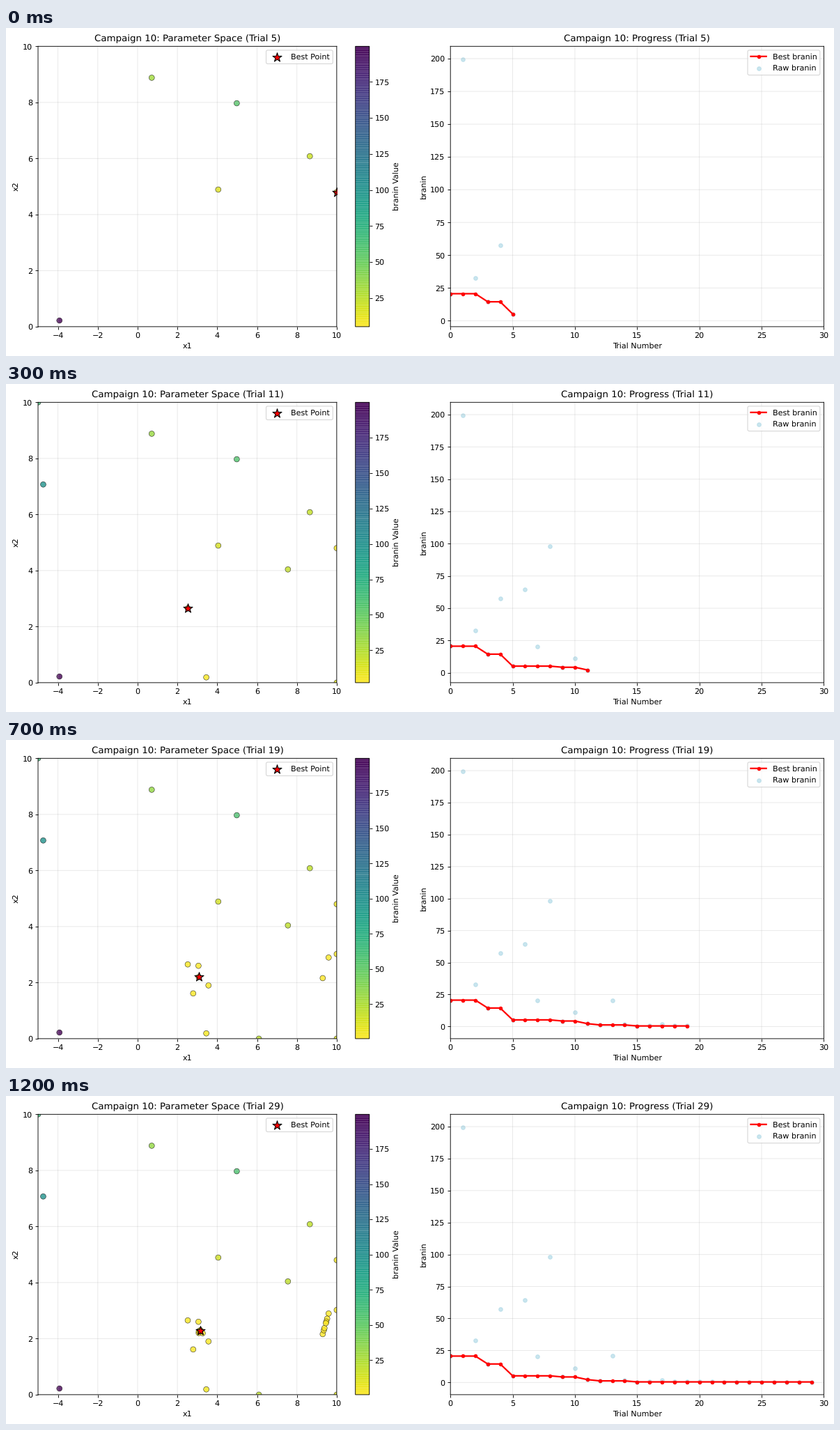
A matplotlib script that plays this animation: 1189x471 px, repeating every 1300 ms.

```python
import numpy as np
import matplotlib.pyplot as plt
from matplotlib.animation import FuncAnimation

# Unhinted, unsnapped drawing keeps everything on fractional pixels
plt.rcParams.update({"text.hinting": "no_hinting", "path.snap": False})

WIDTH, HEIGHT, DPI = 1189, 471, 80
FIRST_TRIAL, STEP, FRAMES, INTERVAL = 5, 2, 13, 100
TRIALS = FIRST_TRIAL + STEP * (FRAMES - 1) + 1

# Wide search of the space: x1 + x2 * j
EXPLORED = [
    8.65 + 6.08j, -3.925 + 0.22j, 0.71 + 8.88j, 4.05 + 4.89j,
    4.98 + 7.97j, 10 + 4.8j, -5 + 10j, 7.55 + 4.04j,
    -4.74 + 7.07j, 3.45 + 0.19j, 10 + 0j, 2.52 + 2.65j,
    3.56 + 1.90j, 6.09 + 0j, 10 + 3.02j, 3.07 + 2.20j,
]
LEFT_MINIMUM, RIGHT_MINIMUM = np.pi + 2.275j, 3 * np.pi + 2.475j
GOLDEN_ANGLE = np.pi * (3 - np.sqrt(5))


def refine(step):
    """Close in on both minima in turn with shrinking, turning offsets."""
    visit, on_left = divmod(step, 2)
    if on_left:
        start, turn = -0.35 - 0.66j, 0.45 * np.exp(-1j * GOLDEN_ANGLE)
        return LEFT_MINIMUM + start * turn ** visit
    return RIGHT_MINIMUM + (0.17 + 0.42j) * (-0.75) ** visit


def branin(x1, x2):
    bowl = x2 - 5.1 / (4 * np.pi ** 2) * x1 ** 2 + 5 / np.pi * x1 - 6
    return bowl ** 2 + 10 * (1 - 1 / (8 * np.pi)) * np.cos(x1) + 10


POINTS = np.array(EXPLORED + [refine(i) for i in range(TRIALS - len(EXPLORED))])
X1, X2 = POINTS.real, POINTS.imag
VALUES = branin(X1, X2)
BEST = np.minimum.accumulate(VALUES)

fig = plt.figure(figsize=(WIDTH / DPI, HEIGHT / DPI), dpi=DPI)


def add_axes(left, width, top=26.3, height=402.6):
    """Add axes placed in pixels from the top left corner."""
    bottom = HEIGHT - top - height
    return fig.add_axes([left / WIDTH, bottom / HEIGHT,
                         width / WIDTH, height / HEIGHT])


def decorate(ax, name, trial, **settings):
    ax.set(title=f"Campaign 10: {name} (Trial {trial})", **settings)
    ax.grid(True, alpha=0.3)
    ax.legend(loc="upper right")


def draw_space(trial):
    ax = add_axes(46, 428.9)
    seen = slice(trial + 1)
    best = VALUES[seen].argmin()
    dots = ax.scatter(X1[seen], X2[seen], c=VALUES[seen], cmap="viridis_r",
                      s=50, alpha=0.8, edgecolors="black", linewidths=0.5)
    ax.scatter(X1[best], X2[best], c="red", marker="*", s=150,
               edgecolors="black", linewidths=1, label="Best Point")
    decorate(ax, "Parameter Space", trial, xlim=(-5, 10), ylim=(0, 10),
             xlabel="x1", ylabel="x2")
    fig.colorbar(dots, cax=add_axes(501.7, 20.1), label="branin Value")


def draw_progress(trial):
    ax = add_axes(638.2, 536.2)
    trials = np.arange(trial + 1)
    ax.plot(trials, BEST[trials], "r-o", linewidth=2, markersize=4,
            label="Best branin")
    ax.scatter(trials, VALUES[trials], c="lightblue", s=25, alpha=0.65,
               label="Raw branin")
    decorate(ax, "Progress", trial, xlim=(0, 30),
             xlabel="Trial Number", ylabel="branin")


def draw(frame):
    trial = FIRST_TRIAL + STEP * frame
    fig.clear()
    draw_space(trial)
    draw_progress(trial)
    return fig.axes


animation = FuncAnimation(fig, draw, frames=FRAMES, interval=INTERVAL,
                          repeat=True, repeat_delay=0, blit=False)
plt.show()
```
